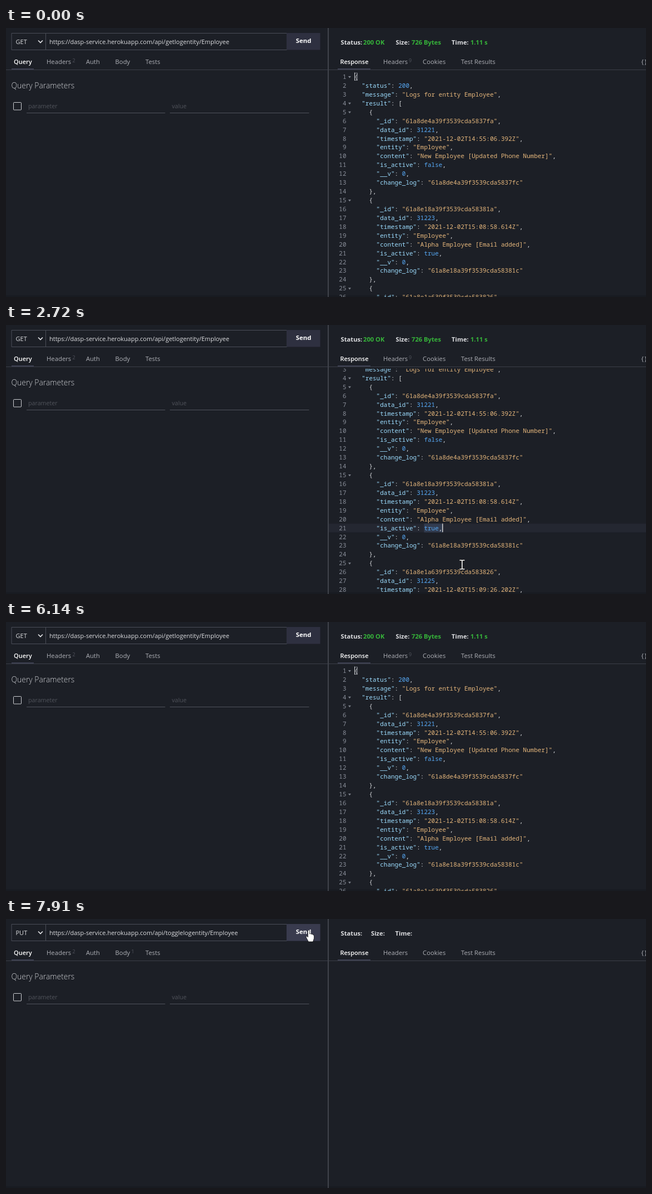
Recreate the animation shown at these times as an HTML page. Size 1152 by 486 pixels, loop 8000 ms.

```html
<!DOCTYPE html>
<html lang="en">
<head>
<meta charset="utf-8">
<title>API client</title>
<style>
html, body { margin: 0; width: 100%; height: 100%; overflow: hidden; background: #1c1f26; }
svg { display: block; width: 1152px; height: 486px; }
text { font: 11px "Open Sans", "Noto Sans", sans-serif; fill: #dcdde0; }
.tab text { font-size: 11.3px; fill: #adafb5; }
.tab .on { font-size: 11px; font-weight: 600; fill: #fff; }
.tab .sup, .sup { font-size: 9px; fill: #50535c; }
.hint text { font-size: 10.7px; fill: #50535b; }
.stat text { font-size: 11.2px; font-weight: 700; }
.stat .ok { fill: #36b53a; }
.title { font-size: 13.9px; font-weight: 300; fill: #d0d2d6; }
.send { font-size: 11.4px; font-weight: 700; fill: #fff; text-anchor: middle; }
.code text { font: 11px "Noto Sans Mono", "DejaVu Sans Mono", monospace; fill: #d4d6da; }
.code .num { fill: #8a8f9a; text-anchor: end; }
.k { fill: #9cdcfe; }
.s { fill: #e6b77c; }
.n { fill: #57a9f5; }

.step { animation: 8s step-end infinite; }
#get { animation-name: get; }
#put { animation-name: put; }
#one { animation-name: one; }
#two { animation-name: two; }
#bracket { animation-name: bracket; }
#mark { animation-name: mark; }
#caret { animation-name: caret; }
#pick { animation-name: pick; }
#blink { animation-name: blink; }
#press { animation-name: press; }
#beam { animation-name: beam; }
#arrow { animation-name: arrow; }
#hand { animation-name: hand; }
#hover { animation-name: hover; }
#scroll { animation: scroll 8s linear infinite; }
#mouse { animation: mouse 8s ease-in-out infinite; }

@keyframes get { 0% { opacity: 1 } 59.875% { opacity: 0 } 76.75% { opacity: 1 } 91.25%, 100% { opacity: 0 } }
@keyframes put { 0% { opacity: 0 } 59.875% { opacity: 1 } 76.75% { opacity: 0 } 91.25%, 100% { opacity: 1 } }
@keyframes one { 0% { opacity: 0 } 59.875% { opacity: 1 } 76.75%, 100% { opacity: 0 } }
@keyframes two { 0% { opacity: 0 } 91.25%, 100% { opacity: 1 } }
@keyframes bracket { 0% { opacity: 1 } 14.25% { opacity: 0 } 59.875%, 100% { opacity: 1 } }
@keyframes mark {
  0% { opacity: 0; transform: none }
  14.25% { opacity: 1; transform: none }
  27.5% { opacity: 1; transform: translateY(159.3px) }
  59.875%, 100% { opacity: 0; transform: none }
}
@keyframes pick {
  0%, 14.25%, 27.5% { width: 0; animation-timing-function: step-end }
  14.26%, 27.51% { width: 0; animation-timing-function: steps(5) }
  16.75%, 29.75%, 100% { width: 33px; animation-timing-function: step-end }
}
@keyframes caret {
  0%, 14.25%, 27.5% { transform: none; animation-timing-function: step-end }
  14.26%, 27.51% { transform: none; animation-timing-function: steps(5) }
  16.75%, 29.75%, 100% { transform: translateX(33px); animation-timing-function: step-end }
}
@keyframes blink { 0% { opacity: 1 } 57.625%, 100% { opacity: 0 } }
@keyframes press { 0% { opacity: 0 } 13.625% { opacity: 1 } 16.75% { opacity: 0 } 27% { opacity: 1 } 29.75%, 100% { opacity: 0 } }
@keyframes beam { 0% { opacity: 0 } 2.25% { opacity: 1 } 45.8%, 100% { opacity: 0 } }
@keyframes arrow { 0% { opacity: 0 } 45.8% { opacity: 1 } 51.25% { opacity: 0 } 79.75% { opacity: 1 } 86.125% { opacity: 0 } 91.25% { opacity: 1 } 96%, 100% { opacity: 0 } }
@keyframes hand { 0% { opacity: 0 } 96%, 100% { opacity: 1 } }
@keyframes hover { 0% { opacity: 0 } 96%, 100% { opacity: 1 } }
@keyframes scroll {
  0%, 31% { transform: none; animation-timing-function: ease-out }
  33% { transform: translateY(-40px); animation-timing-function: step-end }
  59.875%, 100% { transform: none }
}
@keyframes mouse {
  0%, 2.25% { transform: translate(1003px, 469px) }
  11.375%, 13.625% { transform: translate(758px, 252px) }
  16.75% { transform: translate(788px, 250px); animation-timing-function: ease-in }
  19.5% { transform: translate(811px, 330px); animation-timing-function: ease-out }
  21.75% { transform: translate(806px, 418px) }
  24.125%, 27% { transform: translate(754px, 407px) }
  29.75% { transform: translate(786px, 409px) }
  32.75%, 36.5% { transform: translate(821px, 433px); animation-timing-function: ease-in }
  40% { transform: translate(760px, 462px); animation-timing-function: linear }
  43.75% { transform: translate(650px, 440px); animation-timing-function: ease-out }
  46.125%, 46.75% { transform: translate(606px, 429px); animation-timing-function: ease-in }
  51.25% { transform: translate(-14px, 358px); animation-timing-function: step-end }
  79.75% { transform: translate(30px, 327px) }
  86.125% { transform: translate(424px, 130px); animation-timing-function: step-end }
  91.25% { transform: translate(400px, 140px); animation-timing-function: ease-out }
  98.875%, 100% { transform: translate(547px, 30px) }
}
</style>
</head>
<body>
<svg viewBox="0 0 1152 486">
  <defs><clipPath id="pane"><rect x="581" y="79.5" width="571" height="407"/></clipPath></defs>
  <rect width="1152" height="486" fill="#1c1f26"/>
  <rect y="483" width="1152" height="3" fill="#181b21"/>

  <g fill="none" stroke="#4b4e58">
    <path d="M10 9.5H505.5V39.5H10ZM71.5 9.5V39.5"/>
    <path d="M0 75.5H579M581 75.5H1152" stroke="#3b3e48"/>
    <path d="M580 0V486" stroke="#555861" stroke-width="1.3"/>
    <path d="M37 153.5H286.5M295 153.5H545.5" stroke="#50535c"/>
    <path d="M10 74H50M597 74H656" stroke="#3c3f50" stroke-width="2"/>
    <path d="M58 22.5l4 4 4-4" stroke="#e4e5e8" stroke-width="1.7"/>
    <rect x="13.5" y="134.5" width="14" height="13.5" rx="1" stroke="#cdcfd3"/>
  </g>
  <rect x="505" y="9" width="60.5" height="30.5" fill="#2e3040"/>
  <rect id="hover" class="step" x="505" y="9" width="60.5" height="30.5" fill="#393b4e"/>
  <text class="send" x="535.5" y="27">Send</text>

  <g class="tab">
    <text class="on" x="14" y="65">Query</text>
    <text x="73" y="65">Headers</text><text class="sup" x="119.5" y="62">2</text>
    <text x="144" y="65">Auth</text>
    <text x="196.5" y="65">Body</text>
    <text x="251" y="65">Tests</text>
    <text class="on" x="601.5" y="65">Response</text>
    <text x="679" y="65">Headers</text>
    <text x="750" y="65">Cookies</text>
    <text x="819" y="65">Test Results</text>
    <text x="1143.5 1149.5" y="65">{}</text>
  </g>
  <text class="title" x="9.5" y="109">Query Parameters</text>
  <g class="hint"><text x="40" y="144.5">parameter</text><text x="298.5" y="144.5">value</text></g>
  <g class="stat"><text x="602.5" y="29.5">Status:</text></g>

  <g id="get" class="step">
    <text x="17.5" y="29">GET</text>
    <text x="78" y="29">https://dasp-service.herokuapp.com/api/getlogentity/Employee</text>
    <text class="sup" x="725" y="62">9</text>
    <g class="stat">
      <text class="ok" x="643" y="29.5">200 OK</text>
      <text x="701.5" y="29.5">Size:</text><text class="ok" x="730" y="29.5">726 Bytes</text>
      <text x="802" y="29.5">Time:</text><text class="ok" x="836" y="29.5">1.11 s</text>
    </g>
    <g clip-path="url(#pane)">
      <g id="scroll" class="code">
        <g id="mark" class="step">
          <rect x="581" y="239.5" width="571" height="16" fill="#242731"/>
          <rect id="pick" class="step" x="752.5" y="239.5" height="16" fill="#323c50"/>
          <g id="caret" class="step"><rect id="blink" class="step" x="752.3" y="239.5" width="1.2" height="15.5" fill="#fff"/></g>
        </g>
        <g id="bracket" class="step" fill="none">
          <rect x="627.5" y="81.5" width="5" height="13" stroke="#858890"/>
          <path d="M627.5 80.5V95" stroke="#d5d7db"/>
        </g>
        <g id="lines"></g>
      </g>
    </g>
  </g>

  <g id="put" class="step">
    <text x="17.5" y="29">PUT</text>
    <g class="stat"><text x="657" y="29.5">Size:</text><text x="700.5" y="29.5">Time:</text></g>
    <text id="one" class="step" x="78" y="29">https://dasp-service.herokuapp.com/api/togglelog/31221</text>
    <g id="two" class="step">
      <text x="78" y="29">https://dasp-service.herokuapp.com/api/togglelogentity/Employee</text>
      <text class="sup" x="225.5" y="62">1</text>
    </g>
  </g>

  <g id="mouse">
    <circle id="press" class="step" r="13" cx="-1" fill="#c4ba16" fill-opacity=".78"/>
    <g id="beam" class="step" fill="none">
      <path d="M-4.5 -8H-1L0 -7 1 -8H4.5M0 -7V7M-4.5 8H-1L0 7 1 8H4.5" stroke="#111" stroke-width="3"/>
      <path d="M-4.5 -8H-1L0 -7 1 -8H4.5M0 -7V7M-4.5 8H-1L0 7 1 8H4.5" stroke="#fff" stroke-width="1.6"/>
    </g>
    <path id="arrow" class="step" d="M-5 -8V8L-1.5 4.7 1 10 3.5 9 1.2 3.8H6Z" fill="#fff" stroke="#111" stroke-width=".8"/>
    <path id="hand" class="step" d="M-3.5 -9Q-2 -11.5 -.5 -9V-3Q1.5 -4.5 2.8 -2.5 4.5 -3.5 5.5 -1.5 7.5 -2 7.5 1V5L5.5 11H-2.5L-6.8 3Q-7 .5 -5 1L-3.5 3Z" fill="#fff" stroke="#111" stroke-width=".7"/>
  </g>
</svg>
<script>
const LEFT = 627, CHAR = 6.6, ROW = 15.93;
const span = (cls, s) => `<tspan class="${cls}">${s}</tspan>`;
const str = s => span("s", `"${s}"`);
const num = s => span("n", s);
const prop = (key, value, end = ",") => span("k", `"${key}"`) + ": " + value + end;

const record = (id, tail, data, time, note, active) => [
  [4, "{"],
  [6, prop("_id", str(id + tail + "a"))],
  [6, prop("data_id", num(data))],
  [6, prop("timestamp", str(`2021-12-02T${time}Z`))],
  [6, prop("entity", str("Employee"))],
  [6, prop("content", str(note))],
  [6, prop("is_active", num(active))],
  [6, prop("__v", num(0))],
  [6, prop("change_log", str(id + tail + "c"), "")],
  [4, "},"]
];

const rows = [
  [0, "{"],
  [2, prop("status", num(200))],
  [2, prop("message", str("Logs for entity Employee"))],
  [2, prop("result", "[", "")],
  ...record("61a8de4a39f3539cda5837", "f", 31221, "14:55:06.392", "New Employee [Updated Phone Number]", false),
  ...record("61a8e18a39f3539cda5838", "1", 31223, "15:08:58.614", "Alpha Employee [Email added]", true),
  ...record("61a8e1a639f3539cda5838", "26", 31225, "15:09:26.202", "", true).slice(0, 4)
];
rows[25] = [6, prop("_id", str("61a8e1a639f3539cda583826"))];

document.getElementById("lines").innerHTML = rows.map(([indent, body], i) => {
  const y = 92 + i * ROW;
  const fold = /[{[]$/.test(body)
    ? `<path d="M616 ${y - 5}h5l-2.5 3.5z" fill="#7d828c"/>` : "";
  return `<text class="num" x="612.5" y="${y}">${i + 1}</text>${fold}` +
    `<text x="${LEFT + indent * CHAR}" y="${y}">${body}</text>`;
}).join("");
</script>
</body>
</html>
```
